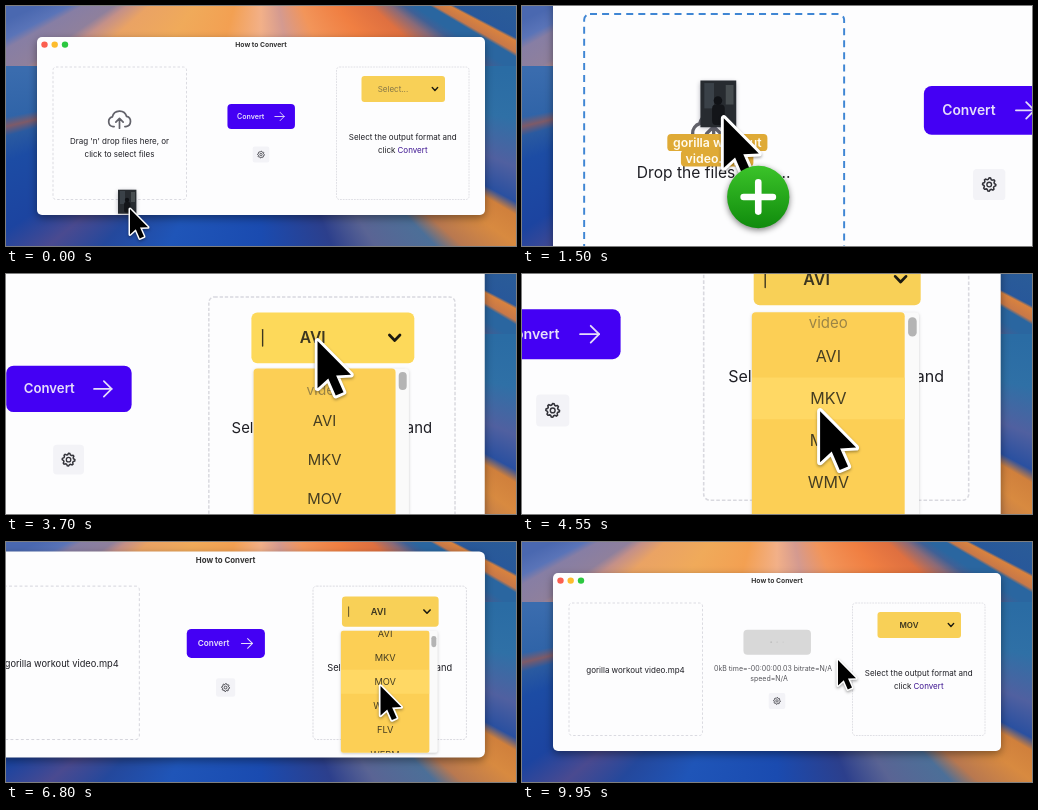
An HTML page with a canvas that plays this animation: 510x240 px, repeating every 10 s.

```html
<!DOCTYPE html>
<html lang="en">
<head>
<meta charset="utf-8">
<title>How to Convert</title>
<style>
html, body { margin: 0; width: 100%; height: 100%; overflow: hidden; }
canvas { display: block; width: 510px; height: 240px; }
</style>
</head>
<body>
<canvas id="stage"></canvas>
<script>
const W = 510, H = 240, LOOP = 10000;
const canvas = document.getElementById('stage');
const ctx = canvas.getContext('2d');
const dpr = window.devicePixelRatio || 1;
canvas.width = W * dpr;
canvas.height = H * dpr;

// Moments when the interface switches state
const ENTER = 420, DROP = 1850, OPEN = 3450, PICK = 6950, START = 8600, REPORT = 9000;

const FORMATS = ['AVI', 'MKV', 'MOV', 'WMV', 'FLV', 'WEBM', '3GP', 'M4V', 'MPG', 'VOB',
  'MPEG', 'ASF', 'RM', 'OGV', 'TS', 'MXF', 'SWF', 'M2TS', 'F4V', 'DV'];
const PITCH = 20.9;

// Tracks: [time, value, ...]
const ZOOM = [[597, 1], [1647, 2], [1900, 2], [2800, 1], [2900, 1], [3950, 2], [6000, 2], [7070, 1]];
const FOCUS_Y = [[2800, 117], [2900, 105.4], [3800, 105.4], [4800, 171], [6000, 171], [6800, 168]];
const POINTER = [[150, 124, 203], [1300, 118.7, 114.5], [2050, 118.7, 114.5], [3200, 389, 84.7],
  [3900, 389, 84.7], [4450, 388.7, 149], [5700, 388.7, 149], [6500, 388.8, 147.3],
  [7250, 388.8, 147.3], [8150, 272, 121], [8800, 272, 121], [9500, 316, 118]];
const SCROLL = [[4450, 0], [5500, 233.6], [5750, 233.6], [6700, 26]];

// Wallpaper rays spread down from a centre; each point lies on a ray of its colour
function fan(cy, points) {
  const gradient = ctx.createConicGradient(0, 255, cy);
  for (const [x, y, color] of points) {
    gradient.addColorStop(Math.atan2(y - cy, x - 255) / (2 * Math.PI), color);
  }
  return gradient;
}
const WARM = fan(-100, [
  [510, 0, '#2a5c98'], [495, 24, '#28589a'], [495, 27, '#d8823f'], [495, 38, '#c87848'],
  [495, 42, '#2a66a0'], [500, 60, '#2a66a0'], [415, 12, '#3f6096'], [400, 12, '#8a6a78'],
  [378, 12, '#df7040'], [340, 12, '#f07f42'], [300, 12, '#f2955a'], [275, 12, '#d49a90'],
  [255, 12, '#f2b088'], [225, 12, '#f3a052'], [180, 12, '#f0aa5a'], [130, 12, '#eaa364'],
  [105, 12, '#c49088'], [90, 12, '#8f809c'], [55, 12, '#877ea4'], [40, 12, '#5a74b8'],
  [5, 12, '#4a68b0']
]);
const COOL = fan(60, [
  [500, 65, '#2a6ca4'], [495, 110, '#2f70a6'], [495, 155, '#5060a0'], [495, 188, '#2a50a0'],
  [495, 200, '#d0803c'], [505, 235, '#d88a40'], [440, 225, '#b87850'], [415, 225, '#4c6f98'],
  [360, 225, '#5a6494'], [320, 225, '#2c3f8c'], [255, 230, '#1a4bb0'], [170, 225, '#1f55b8'],
  [110, 225, '#24489c'], [60, 225, '#4a4a90'], [15, 215, '#1c44a0'], [15, 150, '#1c4ca4'],
  [15, 126, '#2a5aa0'], [15, 117, '#7d5a68'], [15, 108, '#3064a8'], [5, 65, '#3a6cae']
]);

const ARROW = new Path2D('M0 0V25.5L5.8 20.2L9.8 29.4L14 27.6L10 18.6L18 18.2Z');
const HAND = new Path2D('M-2 0C-3 -3 2 -4 3 -1L6 7C8 5 10 6 10.5 7.5C12 6 14 6.5 15 8.5C17 7 19 8.5 19 11L20 17C20 21 18 22 18 25.5H7C5 21 -3 18 -6 14C-7 11 -3 10 0 13L1.5 13Z');
const KNUCKLES = new Path2D('M6.5 14L7.5 20M10.5 14L11.3 20M14.5 14L15 20');
const CLOUD = new Path2D('M-5 7H-6A4.6 4.6 0 0 1 -6.6 -2A6.8 6.8 0 0 1 6.6 -2.4A4.8 4.8 0 0 1 6 7H5M0 8.5V-.5M-3.4 2.8L0 -.6L3.4 2.8');

const ramp = (t, a, b) => Math.min(1, Math.max(0, (t - a) / (b - a)));
const smooth = p => p * p * (3 - 2 * p);

function track(keys, t, i = 1) {
  const next = keys.findIndex(k => k[0] > t);
  if (next === 0) return keys[0][i];
  if (next < 0) return keys[keys.length - 1][i];
  const a = keys[next - 1], b = keys[next];
  return a[i] + (b[i] - a[i]) * smooth(ramp(t, a[0], b[0]));
}

// Rises after `from` and falls after `to`
const pulse = (t, from, to) => smooth(ramp(t, from, from + 150)) - smooth(ramp(t, to, to + 150));

function box(x, y, w, h, r, fill) {
  ctx.beginPath();
  ctx.roundRect(x, y, w, h, r);
  if (fill) { ctx.fillStyle = fill; ctx.fill(); }
}

function outline(color, width, dash = []) {
  ctx.strokeStyle = color;
  ctx.lineWidth = width;
  ctx.setLineDash(dash);
  ctx.stroke();
  ctx.setLineDash([]);
}

function disc(x, y, r, fill) {
  ctx.beginPath();
  ctx.arc(x, y, r, 0, 7);
  ctx.fillStyle = fill;
  ctx.fill();
}

function line(points, color, width) {
  ctx.beginPath();
  points.forEach(([x, y]) => ctx.lineTo(x, y));
  ctx.lineCap = ctx.lineJoin = 'round';
  outline(color, width);
}

function text(str, x, y, { size = 8, weight = 400, color = '#1e1e24', align = 'center' } = {}) {
  ctx.font = `${weight} ${size}px Inter, "Liberation Sans", sans-serif`;
  ctx.textAlign = align;
  ctx.fillStyle = color;
  ctx.fillText(str, x, y + size * 0.35);
}

function at(x, y, scale, draw) {
  ctx.save();
  ctx.translate(x, y);
  ctx.scale(scale, scale);
  draw();
  ctx.restore();
}

function shadow(color, blur, dy = 0) {
  ctx.shadowColor = color;
  ctx.shadowBlur = blur * dpr;
  ctx.shadowOffsetY = dy * dpr;
}

function drawWallpaper() {
  ctx.fillStyle = WARM;
  ctx.fillRect(0, 0, W, 60);
  ctx.fillStyle = COOL;
  ctx.fillRect(0, 60, W, H - 60);
}

function drawWindow() {
  ctx.save();
  shadow('rgba(0,0,0,.4)', 9, 3);
  box(31, 31, 448, 178, 5, '#fdfdfe');
  ctx.restore();
  disc(38.5, 38.6, 3.2, '#fb5f50');
  disc(48.7, 38.6, 3.2, '#fdbc2e');
  disc(59, 38.6, 3.2, '#2cc840');
  text('How to Convert', 255, 38.6, { size: 6.8, weight: 700, color: '#333' });
}

function drawDropZone(t) {
  const over = t >= ENTER && t < DROP;
  box(47, 61, 133.5, 132.5, 3);
  outline(over ? '#3f86d4' : '#d2d2da', over ? 1 : 0.8, over ? [3.6, 2.6] : [2.5, 2]);
  if (t >= DROP) return text('gorilla workout video.mp4', 113.5, 127.8);
  at(113.5, over ? 119.5 : 113, 1.08, () => {
    ctx.lineCap = ctx.lineJoin = 'round';
    ctx.strokeStyle = '#62626a';
    ctx.lineWidth = 1.6;
    ctx.stroke(CLOUD);
  });
  if (over) return text('Drop the files here ...', 113.5, 142.5);
  text("Drag 'n' drop files here, or", 113.5, 135.6);
  text('click to select files', 113.5, 148.6);
}

function drawConvert(t) {
  const reporting = t >= REPORT;
  const shift = reporting ? 10.3 : 0;
  const hover = pulse(t, 8050, START);
  at(255.2, 110.5 - shift, 1 + 0.05 * hover, () => {
    if (t >= START) {
      box(-33.75, -12.5, 67.5, 25, 4, '#d8d8d8');
      for (let i = -1; i < 2; i++) {
        const glow = 0.35 + 0.25 * Math.sin(t / 160 - i);
        disc(i * 6, 0, 0.9, `rgba(160,160,160,${glow})`);
      }
      return;
    }
    box(-33.75, -12.5, 67.5, 25, 4, '#4400f4');
    text('Convert', -24.3, 0, { size: 7.1, weight: 600, color: '#e6defa', align: 'left' });
    line([[13.5, 0], [23, 0]], '#e6defa', 0.9);
    line([[18.8, -4.2], [23, 0], [18.8, 4.2]], '#e6defa', 0.9);
  });
  if (reporting) {
    const style = { size: 7, color: '#55555a' };
    text('0kB time=-00:00:00.03 bitrate=N/A', 251, 126.5, style);
    text('speed=N/A', 247, 136.6, style);
  }
  drawGear(255, 148.6 + shift);
}

function drawGear(x, y) {
  box(x - 8.3, y - 8, 16.6, 16, 2, '#f3f3f7');
  ctx.beginPath();
  for (let i = 0; i < 32; i++) {
    const a = i * Math.PI / 16, r = i % 4 < 2 ? 3.4 : 2.7;
    ctx.lineTo(x + r * Math.cos(a), y + r * Math.sin(a));
  }
  ctx.closePath();
  outline('#33333a', 0.8);
  ctx.beginPath();
  ctx.arc(x, y, 1.2, 0, 7);
  outline('#33333a', 0.7);
}

function drawOutput(t) {
  const open = t >= OPEN && t < PICK;
  const hover = pulse(t, 3080, 4000);
  box(330.5, 61, 132.5, 132.5, 3);
  outline('#d9d9df', 0.8, [1.8, 1]);
  text('Select the output format and', 396.7, 131.6);
  text('click ', 372, 144.2, { align: 'left' });
  text('Convert', 421.5, 144.2, { color: '#3d1490', align: 'right' });

  at(397.25, 83, 1 + 0.05 * hover, () => {
    box(-41.75, -13, 83.5, 26, 3, hover > 0.5 ? '#fdd95a' : '#f8d057');
    const label = t < DROP ? 'Select...' : t < PICK ? 'AVI' : 'MOV';
    text(label, -10.3, 0, t < DROP ? { color: '#857648' } : { weight: 600, color: '#3c3620' });
    line([[29, -1.4], [31.7, 1.4], [34.4, -1.4]], '#1c1a10', 1.4);
    if (open && t % 1000 < 850) line([[-36, -4.2], [-36, 4.2]], '#3c3620', 0.7);
  });
}

function drawMenu(t, py) {
  if (t < OPEN || t >= PICK) return;
  const scroll = track(SCROLL, t);
  ctx.save();
  shadow('rgba(0,0,0,.2)', 3, 1);
  box(354.6, 99.5, 83.6, 105.5, 2, '#fafafa');
  ctx.restore();
  ctx.save();
  box(354.6, 99.5, 76.4, 105.5, 2, '#fccf55');
  ctx.clip();
  text('video', 392.8, 111 - scroll, { size: 7.5, color: '#9a8446' });
  FORMATS.forEach((name, i) => {
    const y = 127.8 + i * PITCH - scroll;
    if (py > 99.5 && Math.abs(py - y) < PITCH / 2) {
      box(354.6, y - PITCH / 2, 76.4, PITCH, 0, '#ffd864');
    }
    text(name, 392.8, y, { color: '#453d22' });
  });
  ctx.restore();
  box(432.7, 101.4 + scroll * 0.101, 4.3, 9.7, 2.1, '#b4b4b4');
}

function drawDraggedFile(t) {
  ctx.save();
  shadow('rgba(40,40,60,.4)', 5, 1);
  box(-12, -19.3, 18.4, 24, 0, '#272b30');
  ctx.restore();
  box(-10, -18, 5, 13, 0, '#3a4148');
  box(1, -17, 4, 10, 0, '#474d50');
  disc(-3, -9, 2.2, '#101216');
  box(-6, -7, 6.5, 10.5, 2, '#131519');
  ctx.globalAlpha = smooth(ramp(t, 200, 450));
  box(-29, 8.2, 51.4, 8.7, 2, '#dfaa36');
  box(-22, 16.4, 37.2, 8.4, 2, '#dfaa36');
  const style = { size: 6.3, weight: 600, color: '#fffbee' };
  text('gorilla workout', -3.3, 12.5, style);
  text('video.mp4', -3.3, 20.7, style);
  ctx.globalAlpha = 1;
}

function drawPlus() {
  const green = ctx.createLinearGradient(0, 24, 0, 57);
  green.addColorStop(0, '#3cc42a');
  green.addColorStop(1, '#0f8a0c');
  ctx.save();
  shadow('rgba(0,0,0,.5)', 6, 2);
  disc(17.7, 40.5, 16, green);
  ctx.restore();
  line([[10.2, 40.5], [25.2, 40.5]], '#fff', 3.4);
  line([[17.7, 33], [17.7, 48]], '#fff', 3.4);
}

function drawPointer(t, x, y) {
  const hand = t > 8050 && t < START + 250;
  const shape = hand ? HAND : ARROW;
  at(x, y, 1, () => {
    if (t < DROP) drawDraggedFile(t);
    ctx.lineJoin = ctx.lineCap = 'round';
    ctx.save();
    shadow('rgba(0,0,0,.35)', 3, 1.5);
    ctx.strokeStyle = '#fff';
    ctx.lineWidth = hand ? 4 : 3;
    ctx.stroke(shape);
    ctx.restore();
    ctx.fillStyle = hand ? '#fff' : '#000';
    ctx.fill(shape);
    if (hand) {
      ctx.strokeStyle = '#000';
      ctx.lineWidth = 1.9;
      ctx.stroke(HAND);
      ctx.lineWidth = 1.5;
      ctx.stroke(KNUCKLES);
    }
    if (t >= ENTER && t < DROP) drawPlus();
  });
}

function render(t) {
  ctx.setTransform(dpr, 0, 0, dpr, 0, 0);
  drawWallpaper();

  // Zoom about the left or right window edge
  const zoom = track(ZOOM, t);
  const focusX = t < 2850 ? 31 : 479.3;
  const focusY = track(FOCUS_Y, t);
  ctx.translate(focusX * (1 - zoom), focusY * (1 - zoom));
  ctx.scale(zoom, zoom);

  const x = track(POINTER, t, 1), y = track(POINTER, t, 2);
  drawWindow();
  drawDropZone(t);
  drawConvert(t);
  drawOutput(t);
  drawMenu(t, y);
  drawPointer(t, x, y);
}

const begin = performance.now();
function tick() {
  render((performance.now() - begin) % LOOP);
  requestAnimationFrame(tick);
}
tick();
</script>
</body>
</html>
```
